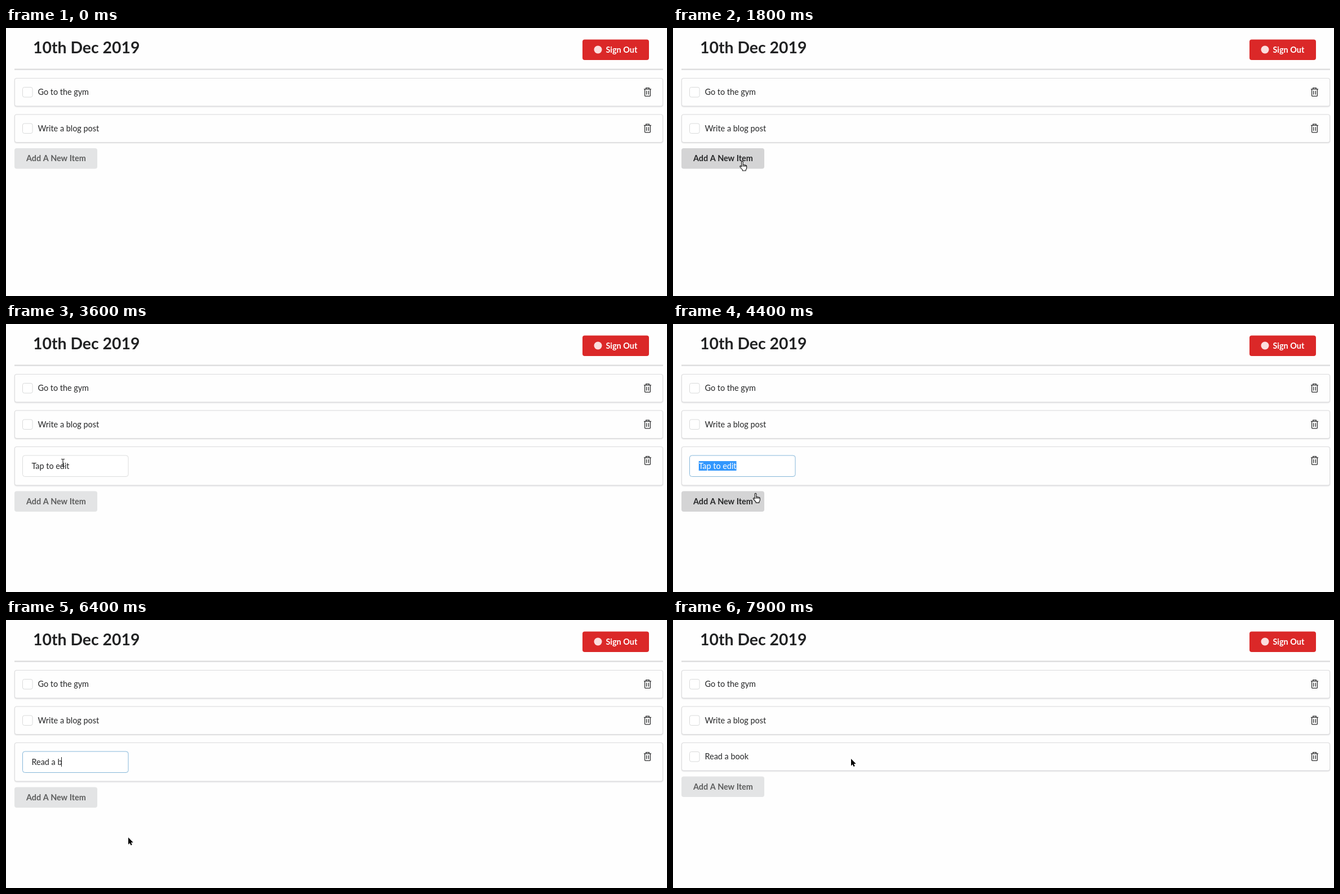
An HTML page with a canvas that plays this animation: 1173 by 477 pixels, repeating every 8000 ms.

```html
<!DOCTYPE html>
<html lang="en">
<head>
<meta charset="utf-8">
<title>Daily list</title>
<style>
html, body { margin: 0; width: 100%; height: 100%; overflow: hidden; background: #fefefe; }
canvas { display: block; }
</style>
</head>
<body>
<canvas id="stage" width="1173" height="477"></canvas>
<script>
const ctx = document.getElementById('stage').getContext('2d');
const LOOP = 8000, STEP = 100;
const ADD = 2500, BLUR = 3400, EDIT = 3500, FOCUS = 3900, WORD = 4000, ALL = 4100, SAVE = 7700;
const INK = '#252627';
const TEXT = 'Read a book';
const KEYS = [5200, 5500, 5600, 5700, 5800, 6000, 6100, 6400, 6500, 6800, 6900];

// Pointer positions: time, x, y
const PATH = [
  [0, 8, -40], [300, 8, -40], [400, 8, -5], [500, 8, -40], [800, 8, -40],
  [900, 55, 287], [1000, 55, 287], [1800, 123, 238], [2700, 123, 238],
  [2800, 127, 239], [3200, 101, 247], [4100, 101, 247], [4800, 217, 387],
  [7300, 217, 387], [7400, 288, 282], [7700, 316, 247], [8000, 316, 247]
];

function pointerAt(t) {
  const i = PATH.findIndex(p => p[0] > t);
  const [t0, x0, y0] = PATH[i - 1], [t1, x1, y1] = PATH[i];
  const u = (t - t0) / (t1 - t0), e = u * u * (3 - 2 * u);
  return { x: x0 + (x1 - x0) * e, y: y0 + (y1 - y0) * e };
}

const inside = (p, x, y, w, h) => p.x >= x && p.x <= x + w && p.y >= y && p.y <= y + h;

function font(size, weight = 400) {
  ctx.font = `${weight} ${size}px Lato, sans-serif`;
}

function label(str, x, y, size, color = INK, weight = 400) {
  font(size, weight);
  ctx.fillStyle = color;
  ctx.fillText(str, x, y);
}

function box(x, y, w, h, r, fill, stroke) {
  ctx.beginPath();
  ctx.roundRect(x, y, w, h, r);
  ctx.fillStyle = fill;
  ctx.fill();
  if (stroke) {
    ctx.strokeStyle = stroke;
    ctx.lineWidth = 1;
    ctx.stroke();
  }
}

function outline(path, color, width) {
  ctx.strokeStyle = color;
  ctx.lineWidth = width;
  ctx.stroke(path);
}

const trashPath = new Path2D(
  'M-6.5-5.2H6.5M-2.8-5.2V-7.3H2.8V-5.2M-4.9-5.2V6.2Q-4.9 7.3-3.8 7.3H3.8Q4.9 7.3 4.9 6.2V-5.2M-1.8-2.3V4.4M1.8-2.3V4.4');
const arrowPath = new Path2D('M0 0V12.4L2.8 9.9L4.6 14L6.7 13.1L4.9 9.1H8.7Z');
const handPath = new Path2D(
  'M-1.4 9V.6Q-1.4-.9-.1-.9T1.2.6V6Q2.4 4.9 3.7 6.2Q5-5.6-1 6.4'.replace('Q5-5.6-1 6.4', 'Q5 5.4 6 6.7Q7.7 6.2 7.7 8V11Q7.7 13 6.2 14.4V16H.4V14.4Q-1.8 12.4-4 9.3Q-4.7 7.8-3.2 7.4Q-2.2 7.6-1.4 9Z'));
const beamPath = new Path2D('M-3-6.5H-1Q0-6.5 0-5.5Q0-6.5 1-6.5H3M0-5.5V5.5M-3 6.5H-1Q0 6.5 0 5.5Q0 6.5 1 6.5H3');

function trash(y) {
  ctx.save();
  ctx.translate(1138.5, y);
  outline(trashPath, '#303132', 1.3);
  ctx.restore();
}

function card(y, h) {
  ctx.save();
  ctx.shadowColor = 'rgba(34,36,38,.15)';
  ctx.shadowOffsetY = 1;
  ctx.shadowBlur = 2;
  box(15, y, 1151, h, 4, '#dcdcdd');
  ctx.restore();
  box(16, y + 1, 1149, h - 2, 3, '#fefefe');
  trash(y + 25);
}

function item(y, str, hover) {
  card(y, 50.5);
  box(29.5, y + 16.5, 17.5, 17.5, 3, '#fff', hover ? '#b3b4b5' : '#d9dada');
  label(str, 56.5, y + 30, 14.4);
}

function editor(y, t) {
  card(y, 69.5);
  const focused = t >= FOCUS;
  box(29.5, y + 16, 187.5, 37.5, 4, '#fff', focused ? '#85b7d9' : '#dcdddd');
  const typed = KEYS.filter(k => k <= t);
  const str = typed.length ? TEXT.slice(0, typed.length) : 'Tap to edit';
  const x = 45.5, base = y + 40;
  font(14.4);
  const width = s => ctx.measureText(s).width;
  label(str, x, base, 14.4);
  if (!typed.length && t >= WORD) {
    const start = t >= ALL ? 0 : width('Tap to ');
    ctx.save();
    ctx.beginPath();
    ctx.rect(x + start, y + 26, width(str) - start, 17);
    ctx.clip();
    ctx.fillStyle = '#3297fd';
    ctx.fillRect(x, y + 26, 120, 17);
    label(str, x, base, 14.4, '#fff');
    ctx.restore();
  } else if (focused) {
    const last = typed.length ? typed[typed.length - 1] : FOCUS;
    if (t - last < 500) {
      ctx.fillStyle = '#222';
      ctx.fillRect(Math.round(x + width(str) - 1), y + 26, 1, 17);
    }
  }
}

function pointer(p, kind) {
  ctx.save();
  ctx.translate(p.x, p.y);
  ctx.lineJoin = 'round';
  if (kind === 'hand') {
    ctx.fillStyle = '#fff';
    ctx.fill(handPath);
    outline(handPath, '#111', 1.1);
    ctx.beginPath();
    ctx.moveTo(1.2, 6); ctx.lineTo(1.2, 9);
    ctx.moveTo(3.6, 6.4); ctx.lineTo(3.6, 9);
    ctx.moveTo(5.9, 6.8); ctx.lineTo(5.9, 9);
    ctx.stroke();
  } else if (kind === 'beam') {
    outline(beamPath, '#222', 1.1);
  } else {
    outline(arrowPath, '#fff', 1.6);
    ctx.fillStyle = '#000';
    ctx.fill(arrowPath);
  }
  ctx.restore();
}

function draw(t) {
  const p = pointerAt(t);
  const added = t >= ADD, editing = t >= EDIT && t < SAVE;
  const buttonY = editing ? 297.5 : added ? 278.5 : 214;
  const overButton = inside(p, 15, buttonY, 147, 36.5);
  const overLabel = added && !editing && inside(p, 29, 234, 92, 19);
  const overInput = editing && inside(p, 29, 234, 188, 38);

  ctx.fillStyle = '#fefefe';
  ctx.fillRect(0, 0, 1173, 477);
  label('10th Dec 2019', 48, 45, 28.4, '#212223', 700);
  box(1023, 20.5, 118, 36.5, 4, '#db2828');
  ctx.beginPath();
  ctx.arc(1050.5, 38.5, 7, 0, Math.PI * 2);
  ctx.fillStyle = '#fbdede';
  ctx.fill();
  label('Sign Out', 1064.5, 44, 14.4, '#fff', 700);
  ctx.fillStyle = '#dbdbdc';
  ctx.fillRect(15, 72.5, 1151, 2.3);

  item(89, 'Go to the gym');
  item(153.5, 'Write a blog post');
  if (editing) editor(218, t);
  else if (added) item(218, t >= SAVE ? TEXT : 'Tap to edit', overLabel);

  const pressed = t >= ADD - STEP && t < ADD;
  const active = overButton || (added && t < BLUR);
  box(15, buttonY, 147, 36.5, 4, pressed ? '#c2c3c4' : active ? '#d4d4d5' : '#e3e4e5');
  label('Add A New Item', 36, buttonY + 23.3, 14.4, active ? '#252627' : '#5c5d5d', 700);

  pointer(p, overButton ? 'hand' : overLabel || overInput ? 'beam' : 'arrow');
}

function frame(now) {
  draw(Math.floor((now % LOOP) / STEP) * STEP);
  requestAnimationFrame(frame);
}
draw(0);
requestAnimationFrame(frame);
</script>
</body>
</html>
```
